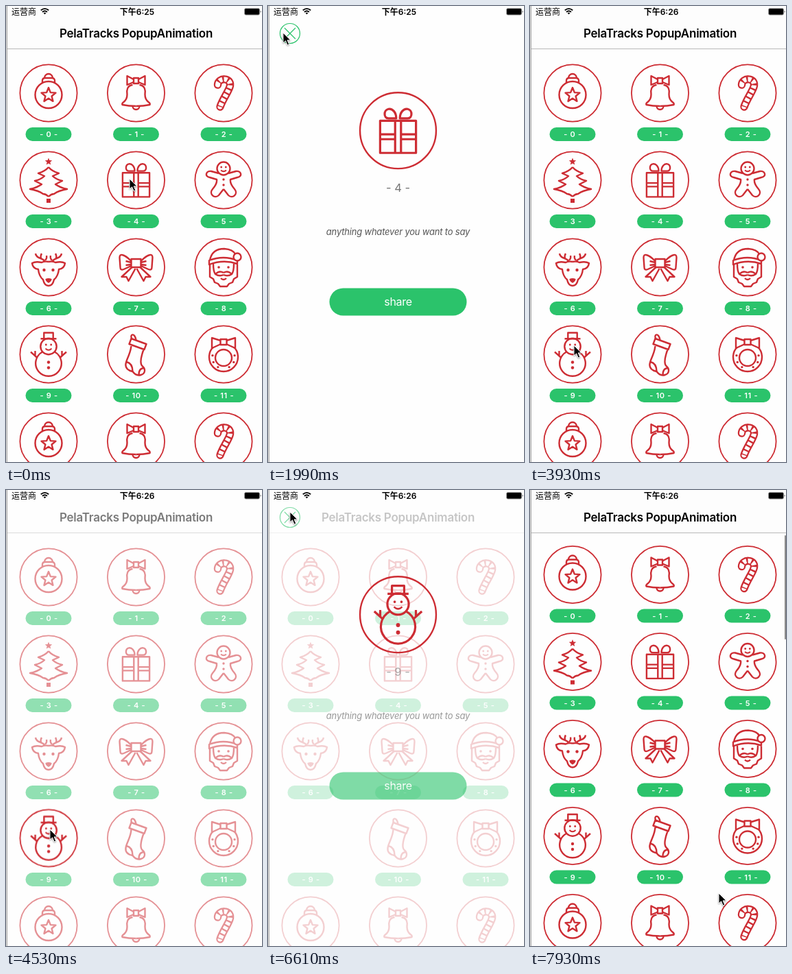
Animation, 373 px wide and 665 px high, one loop 8000 ms. Source, as an HTML page:

```html
<!DOCTYPE html>
<html lang="zh">
<head>
<meta charset="utf-8">
<title>Popup animation</title>
<style>
  html, body { margin: 0; width: 100%; height: 100%; overflow: hidden; background: #fefefe; }
  svg { display: block; width: 100%; height: 100%; }
  text { font-family: Inter, "Noto Sans CJK SC", "Noto Sans CJK", sans-serif; text-anchor: middle; }
  .icon { fill: none; stroke: #cd2c33; stroke-width: 2.4; stroke-linejoin: round; }
  .solid { fill: #cd2c33; stroke: none; }
  .paper { fill: #fefefe; }
  .ring { stroke-width: 1.8; }
  .pill { fill: #2bc36b; }
  .pill + text { fill: #fff; }
  .tag { font-size: 11px; font-weight: 600; letter-spacing: .7px; }
  #cursor { filter: drop-shadow(0 1px 1px #0006); }
</style>
</head>
<body>
<svg viewBox="0 0 373 665" preserveAspectRatio="none">
  <defs id="icons"></defs>
  <rect width="373" height="665" fill="#fefefe"/>
  <g id="list">
    <g id="cells"></g>
    <rect width="373" height="62" fill="#fdfdfd"/>
    <path d="M2 62.5H373" stroke="#b9b9b9"/>
    <text x="189.5" y="46" font-size="17" font-weight="600" letter-spacing="-.25">PelaTracks PopupAnimation</text>
    <rect id="bar" x="371" y="66" width="2" height="152" rx="1" fill="#8c8c8c"/>
  </g>
  <use id="flyer"/>
  <g id="detail">
    <g fill="none" stroke="#2bc36b" stroke-width="1.2">
      <circle cx="32" cy="40" r="14.5"/>
      <path d="M24 32L40 48M40 32L24 48"/>
    </g>
    <text id="number" x="189.5" y="271" font-size="16.5" fill="#777"></text>
    <text x="189.5" y="334" font-size="13" font-style="italic" letter-spacing="-.2" fill="#555">anything whatever you want to say</text>
    <rect class="pill" x="89.5" y="411.5" width="200" height="40" rx="20"/>
    <text x="189.5" y="437" font-size="16" letter-spacing="-.3">share</text>
  </g>
  <text x="26" y="13" font-size="12">运营商</text>
  <g fill="none" stroke="#000" stroke-width="1.8">
    <path d="M50.8 6.3Q56.5 1.5 62.2 6.3M53 8.8Q56.5 5.8 60 8.8"/>
    <path d="M56.5 12.2L54.6 10.2Q56.5 8.6 58.4 10.2Z" fill="#000" stroke="none"/>
  </g>
  <text id="clock" x="191" y="13" font-size="12" font-weight="600"></text>
  <rect x="347.5" y="3.5" width="22" height="9.5" rx="2" fill="#000" stroke="#999"/>
  <path d="M370.7 6.5q1.6 1.7 0 3.5z"/>
  <path d="M.5 0V665" stroke="#e2e2e2"/>
  <path d="M1.5 0V665" stroke="#a0a0a0"/>
  <path id="cursor" d="M0 0V15L3.6 11.8L6.2 18L8.8 16.9L6.2 10.9H11Z" stroke="#fff" stroke-width="1"/>
</svg>
<script>
const $ = id => document.getElementById(id);
const clamp = x => Math.min(1, Math.max(0, x));
const ease = x => (x = clamp(x), x * x * (3 - 2 * x));
const mix = (a, b, k) => a + (b - a) * k;

// Icon parts, all around (0, 0) inside a ring of radius 42
const path = (d, extra = '') => `<path d="${d}" ${extra}/>`;
const both = (d, extra) => path(d, extra) + `<g transform="scale(-1 1)">${path(d, extra)}</g>`;
const circle = (x, y, r, cls = '') => `<circle cx="${x}" cy="${y}" r="${r}" class="${cls}"/>`;
const dot = (x, y, r = 1.7) => circle(x, y, r, 'solid');
const eyes = (x, y, r) => dot(-x, y, r) + dot(x, y, r);
const star = (x, y, r, extra) => path('M' + Array.from({length: 10}, (_, i) => {
  const a = (i / 5 - .5) * Math.PI, q = i % 2 ? r * .44 : r;
  return [x + q * Math.cos(a), y + q * Math.sin(a)].map(n => n.toFixed(2));
}).join('L') + 'Z', extra);
const SOLID = 'class="solid"', PAPER = 'class="paper"';
const cane = 'M-8.5-12C-8-23 11-23 9.5-11C8.5-4-1 8-5 20';

const icons = [
  // bauble
  circle(0, 2.5, 19.5) + star(0, 3, 11) + path('M-9-15v-3q0-4 4-4h10q4 0 4 4v3M-6-22a6 6 0 0 1 12 0'),
  // bell
  both('M-5-12C-13-11-14-4-13 2Q-13 9-18 13Q-21 15-20 17Q-11 19 0 19') + path('M-5 19a5 5 0 0 0 10 0') +
    both('M-3.5-20L-13-25V-12L-3.5-16') + path('M-3.5-22h7v8h-7z'),
  // candy cane
  path(cane, 'stroke-width="11.5" stroke-linecap="round"') +
    path(cane, 'stroke-width="7" stroke-linecap="round" style="stroke:#fefefe"') +
    path(cane, 'stroke-width="9" stroke-dasharray="2.3 4.8" stroke-dashoffset="-4"'),
  // tree
  star(0, -27, 5.5, SOLID) + both('M0-19Q5-13 15-10L6-6Q11-1 20 1L10 6Q17 11 27 13Q15 15 8 20Q4 20 0 24') +
    path('M-3 27h6v6h-6z', SOLID),
  // gift
  path('M-19.6-10.8H19.6V24.4H-19.6ZM-3.2-10.8V24.4M3.2-10.8V24.4') + both('M-19.6 4.1H-3.2M-19.6 9.4H-3.2') +
    both('M-2-13.4C-2-20-6-24.4-10.5-23.6C-16-22.5-16-13.4-10.5-13.4Z'),
  // gingerbread man
  circle(0, -17, 9.5) + both('M-7-10L-18-13C-26-14-28-5-20-4L-10-1Q-9 5-16 13C-22 20-13 28-7 22L0 13') +
    eyes(3.3, -19, 1.4) + path('M-4-14.5Q0-11 4-14.5', 'stroke-width="1.8"') + dot(0, -1) + dot(0, 7),
  // deer
  both('M0-8Q-6-9-10-7Q-19-9-24-6Q-23 2-15 3Q-14 13-8 18Q-6 27 0 27') + eyes(6.5, 4, 2.2) +
    path('M0 23Q-5 20-4.5 17Q0 15 4.5 17Q5 20 0 23', SOLID) +
    both('M-6-9C-8-14-18-12-19-20M-11-13Q-12-17-10-20M-5-10Q-2-13-3-17'),
  // bow
  path('M-7-12H7V0H-7Z') + both('M-7-9Q-15-17-20-18Q-24-19-24-14L-23 0Q-23 5-18 3L-7-2M-7-7L-15-9M-7-4L-15-3') +
    both('M-6 0L-21 14L-14 14L-11 20L-1 2'),
  // Santa
  path('M-20-10Q-17-27 1-27Q14-26 17-19M-21-10Q0-18 20-10V-5Q0-12-21-4Z') + circle(20, -15, 5.5, 'paper') +
    both('M-20-4V14L-15 17L-13 22L-8 24L-5 28H0M-15-5Q-15 6-12 10') + eyes(7, 0, 1.8) +
    both('M0 8Q-6 4-12 10Q-6 14 0 11') + path('M-4 16Q0 20 4 16'),
  // snowman
  path('M-9-3.5A18.8 18.8 0 1 0 9-3.5') + circle(0, -11.5, 11.7) + path('M-6.7-23V-31.5H6.7V-23M-11.5-22.7H11.5') +
    eyes(3.7, -14, 1.4) + path('M-4.5-8.5Q0-4 4.5-8.5', 'stroke-width="1.8"') +
    dot(0, 11.5, 2.2) + dot(0, 19.5, 2.2) + both('M-16.5 5L-26-3.5M-19.5 2V-5'),
  // stocking
  path('M-7-23L15-15L12-7L-10-15ZM-7-14C-7-2-14 6-15 14C-16 21-10 24-5 25Q0 32 7 30C14 28 14 21 9 17C5 13 7 4 11-7') +
    path('M-14 11Q-5 13-5 25M12 20Q4 20 4 30M-6-22C-10-30-2-32 0-21'),
  // wreath
  circle(0, 4, 21) + circle(0, 5, 12) +
    [-10, 25, 60, 120, 155, 190].map(a => a * Math.PI / 180)
      .map(a => dot(16.3 * Math.cos(a), 4.5 + 16.3 * Math.sin(a))).join('') +
    both('M-4-20L-17-24V-9L-4-15Z', PAPER) + path('M-4.5-22h9v8h-9z', PAPER),
];
$('icons').innerHTML = icons.map((art, i) =>
  `<g id="icon${i}" class="icon">${circle(0, 0, 41.6, 'ring')}${art}</g>`).join('');

const cellAt = i => [62 + i % 3 * 127.5, 127 + Math.floor(i / 3) * 127];
$('cells').innerHTML = Array.from({length: 15}, (_, i) => {
  const [x, y] = cellAt(i);
  return `<use id="cell${i}" href="#icon${i % 12}" x="${x}" y="${y}"/>
    <rect class="pill" x="${x - 33.5}" y="${y + 50}" width="67" height="20" rx="10"/>
    <text class="tag" x="${x + .6}" y="${y + 64}">- ${i} -</text>`;
}).join('');

// Bursts of movement: first step, last step, number of steps
const bursts = [[500, 940, 4], [1690, 1990, 3], [2740, 3190, 4], [3490, 3930, 4],
  [4530, 4970, 4], [5720, 6160, 4], [6610, 7640, 8], [7790, 7930, 2]];
const popups = [
  {item: 4, open: 492, close: 2740, fly: 2735},
  {item: 9, open: 4522, close: 6610, fly: 6695},
];
const moves = [
  {at: 1590, dur: 400, to: [22, 39], bend: 0},
  {at: 3400, dur: 530, to: [64, 495], bend: 0},
  {at: 5640, dur: 520, to: [32, 32], bend: 32},
  {at: 7110, dur: 530, to: [275, 588], bend: 0},
];

// Steps fall on a 10 ms clock, so each may come a little early
function hold(t) {
  const burst = bursts.filter(b => b[0] <= t).pop();
  if (!burst) return 0;
  const [first, last, count] = burst, gap = (last - first) / (count - 1);
  return first + gap * Math.min(count - 1, Math.floor((t - first + 5) / gap));
}

function cursorAt(t) {
  let [x, y] = [180, 252];
  for (const {at, dur, to, bend} of moves) {
    const k = ease((t - at) / dur);
    x = mix(x, to[0], k) + bend * Math.sin(Math.PI * k);
    y = mix(y, to[1], k);
  }
  return [x, y];
}

function drawPopup(t) {
  const popup = popups.find(p => t >= p.open && t < p.fly + 450);
  let list = 1, detail = 0;
  for (const {item} of popups) $('cell' + item).style.display = popup && popup.item === item ? 'none' : '';
  $('flyer').style.display = popup ? '' : 'none';
  if (popup) {
    const {item, open, close, fly} = popup, [x, y] = cellAt(item);
    const closing = t >= close;
    const k = closing ? 1 - ease((t - fly) / 450) : ease((t - open) / 440);
    list = closing ? clamp((t - close + 40) / 180) : 1 - clamp((t - open + 40) / 100);
    detail = closing ? 1 - clamp((t - close + 40) / 100) : clamp((t - open - 250) / 150);
    $('flyer').setAttribute('href', '#icon' + item);
    $('flyer').setAttribute('transform',
      `translate(${mix(x, 189.5, k)} ${mix(y, 181.7, k)}) scale(${mix(1, 1.333, k)})`);
    $('number').textContent = `- ${item} -`;
  }
  $('list').style.opacity = list;
  $('detail').style.opacity = detail;
}

function draw(now) {
  const t = hold(now % 8000);
  drawPopup(t);
  $('cells').setAttribute('transform', `translate(0 ${-3.5 * clamp((t - 7700) / 230)})`);
  $('bar').style.display = t >= 7790 ? '' : 'none';
  $('clock').textContent = t < 3600 ? '下午6:25' : '下午6:26';
  $('cursor').setAttribute('transform', `translate(${cursorAt(t)})`);
}

let start;
function tick(now) {
  start ??= now;
  draw(now - start);
  requestAnimationFrame(tick);
}
draw(0);
requestAnimationFrame(tick);
</script>
</body>
</html>
```
